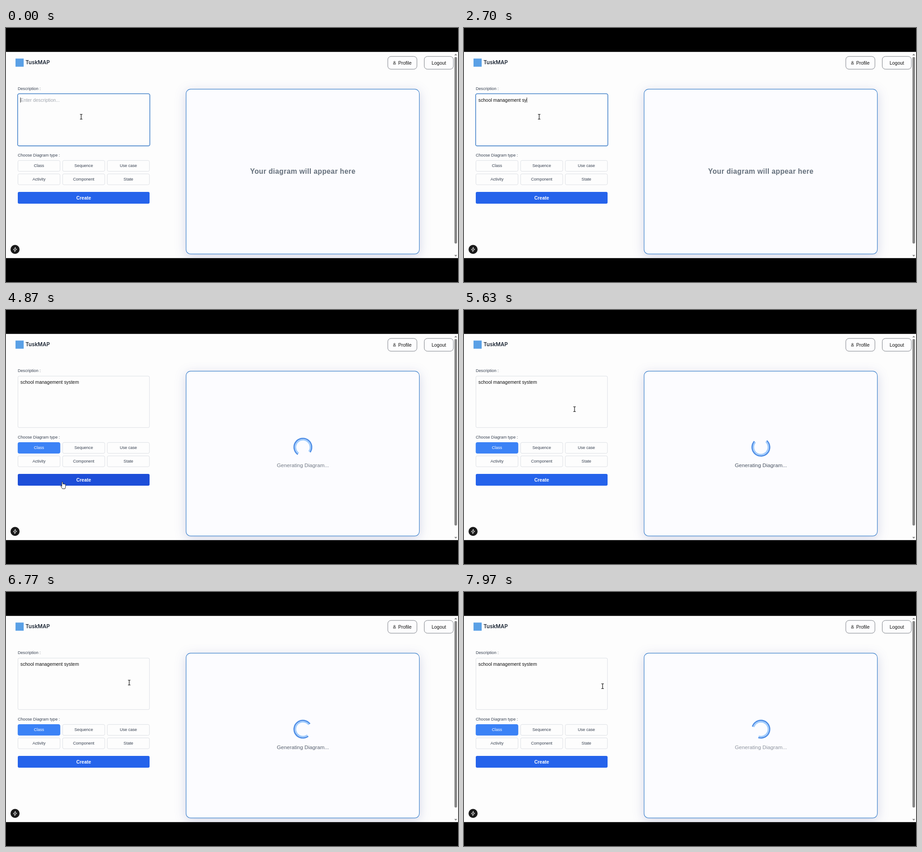
An HTML page for the animation above (8000 ms loop, 998 px wide and 561 px high).

```html
<!DOCTYPE html>
<html lang="en">
<head>
<meta charset="utf-8">
<title>Diagram generator</title>
<style>
html, body { margin: 0; width: 100%; height: 100%; overflow: hidden; background: #000; }
svg { display: block; width: 998px; height: 561px; font-family: "Liberation Sans", Arial, sans-serif; }
text { white-space: pre; }
.mid { text-anchor: middle; }
.label { font-size: 9.1px; fill: #374151; }
.body { font-size: 10.4px; fill: #111; }
.brand { font: 600 11.7px Inter, sans-serif; fill: #1f2937; }
.outline { fill: #fdfdfe; stroke: #7b7f86; }
.box { fill: #fdfdfd; stroke: #dcdfe4; }
.card { fill: #fcfcff; stroke: #3f83cd; stroke-width: 1.2; filter: drop-shadow(0 5px 12px rgba(50, 60, 150, .2)); }

/* one 8 s timeline shared by every scene change */
.focus, .early, .late, .beam, .hand { animation: 8s step-end infinite; }
.focus { animation-name: focus; }
.early { animation-name: early; }
.late { animation-name: late; }
.beam { animation-name: beam; }
.hand { animation-name: hand; }
@keyframes focus { 0% { opacity: 1 } 50.875%, 100% { opacity: 0 } }
@keyframes early { 0% { opacity: 1 } 57.94%, 100% { opacity: 0 } }
@keyframes late { 0% { opacity: 0 } 57.94%, 100% { opacity: 1 } }
@keyframes beam { 0% { opacity: 1 } 48.2% { opacity: 0 } 67.5%, 100% { opacity: 1 } }
@keyframes hand { 0% { opacity: 0 } 48.2% { opacity: 1 } 67.5%, 100% { opacity: 0 } }

.pick { animation: pick 8s linear infinite; }
.pick-text { animation: pick-text 8s linear infinite; }
.create { animation: create 8s linear infinite; }
@keyframes pick {
  0%, 50.875% { fill: #fdfdfd; stroke: #dcdfe4 }
  51.8%, 100% { fill: #3b82f6; stroke: #3b82f6 }
}
@keyframes pick-text { 0%, 50.875% { fill: #374151 } 51.8%, 100% { fill: #fff } }
@keyframes create {
  0%, 55% { fill: #2563eb }
  56%, 64.5% { fill: #1d4ed8 }
  65.5%, 100% { fill: #2563eb }
}

.spin { animation: spin .5s linear -365ms infinite; }
.pulse { animation: pulse 1s cubic-bezier(.4, 0, .6, 1) -365ms infinite; }
@keyframes spin { to { transform: rotate(360deg) } }
@keyframes pulse { 50% { opacity: .5 } }

.pointer { animation: move 8s linear infinite; }
@keyframes move {
  0%, 45.6% { transform: translate(166px, 196px) }
  47.875% { transform: translate(76px, 294px) }
  49.1%, 52% { transform: translate(72px, 314px) }
  54% { transform: translate(92px, 346px) }
  57%, 60.9% { transform: translate(126px, 387px) }
  61.5% { transform: translate(127px, 386px) }
  64.8% { transform: translate(166px, 364px) }
  67.5% { transform: translate(221px, 272px) }
  70.375% { transform: translate(244px, 219px) }
  71.6% { transform: translate(248px, 217px) }
  81.5% { transform: translate(262px, 214px) }
  84.625% { transform: translate(272px, 200px) }
  92.5% { transform: translate(291px, 203px) }
  99.6%, 100% { transform: translate(306px, 208px) }
}
</style>
</head>
<body>
<svg viewBox="0 0 998 561">
  <rect y="52.5" width="998" height="456" fill="#fdfdfd"/>

  <rect x="21" y="67.5" width="18" height="18" fill="#5aa0e6"/>
  <text class="brand" x="43" y="80.3">TuskMAP</text>
  <rect class="outline" x="843" y="62.8" width="64.3" height="28.2" rx="7"/>
  <g fill="none" stroke="#222" stroke-width=".9">
    <circle cx="857.7" cy="75.2" r="1.6"/>
    <path d="M855.3 80V79a2.4 2.1 0 0 1 4.8 0V80Z"/>
  </g>
  <text class="body" x="866" y="80.6">Profile</text>
  <rect class="outline" x="923.5" y="62.8" width="64.3" height="28.2" rx="7"/>
  <text class="body mid" x="955.7" y="80.6">Logout</text>

  <text class="label" x="26" y="136.5">Description :</text>
  <rect class="box" x="26.3" y="146" width="290.5" height="113.7" rx="3"/>
  <rect class="focus" x="25.7" y="145.2" width="291.9" height="115.2" rx="3.5" fill="#fdfdfd" stroke="#4482c9" stroke-width="1.6"/>
  <text class="body" id="hint" x="32" y="162.7" style="fill:#a2a7af">Enter description...</text>
  <text class="body" id="typed" x="31.7" y="162.7"></text>
  <rect id="caret" y="153.5" width=".9" height="11.2" fill="#111"/>

  <text class="label" x="26" y="283.8">Choose Diagram type :</text>
  <g id="types"></g>
  <rect class="create" x="26" y="362" width="291" height="26" rx="3"/>
  <text class="mid" x="171.5" y="378.8" font-size="10.4" font-weight="700" fill="#fff">Create</text>

  <rect class="card" x="397.6" y="135.2" width="515" height="364" rx="10"/>
  <text class="early" x="539" y="322" font-size="15.6" font-weight="700" letter-spacing=".39" fill="#65707c">Your diagram will appear here</text>
  <g class="late">
    <g transform="translate(655.5 303)">
      <g class="spin" fill="none">
        <g transform="rotate(-45)">
          <circle r="19.4" stroke="#3f84e4" stroke-width="2.6" pathLength="100" stroke-dasharray="75 25"/>
          <circle r="16.2" stroke="#93c5fd" stroke-width="2.4" pathLength="100" stroke-dasharray="75 25"/>
        </g>
      </g>
    </g>
    <text class="pulse mid" x="655.5" y="347" font-size="11.7" fill="#4b5563">Generating Diagram...</text>
  </g>

  <circle cx="20" cy="489" r="10" fill="#1a1a1a"/>
  <path d="M20.8 484.2L16.2 490h3.4l-.6 4.2 4.8-5.9h-3.5Z" fill="none" stroke="#fff" stroke-linejoin="round"/>

  <g fill="#858585">
    <rect x="990.2" y="64" width="5.6" height="412" rx="2.8"/>
    <path d="M989.8 60.5h6.4L993 56.7ZM989.8 501.3h6.4L993 505Z"/>
  </g>
  <path d="M0 0H998V52.5H0ZM0 508.5H998V561H0Z"/>

  <g class="pointer">
    <path class="beam" d="M-2.6-5.4Q0-5.6 0-4.4Q0-5.6 2.6-5.4M0-4.6V4.6M-2.6 5.4Q0 5.6 0 4.4Q0 5.6 2.6 5.4" fill="none" stroke="#111" stroke-width="1.2"/>
    <path class="hand" d="M-2.8 2.5V-6a1.2 1.2 0 0 1 2.4 0V-2.4a1.1 1.1 0 0 1 2.1 .2a1.1 1.1 0 0 1 2 .5a1 1 0 0 1 1.9 .7V3L4.3 7.8H-1.4L-5 2.3a1.1 1.1 0 0 1 1.6-1.3Z" fill="#fff" stroke="#111" stroke-width=".9" stroke-linejoin="round"/>
  </g>
</svg>
<script>
const $ = id => document.getElementById(id);
const LOOP = 8000, BLUR = 4070, BLINK = 260;
const phrase = "school management system";
const keys = [30, 200, 370, 630, 760, 870, 940, 1030, 1100, 1370, 1430, 1670, 1730,
  1930, 2030, 2270, 2370, 2430, 2570, 2670, 2730, 2970, 3100, 3270];

$("types").innerHTML = ["Class", "Sequence", "Use case", "Activity", "Component", "State"].map((name, i) => {
  const x = 26.3 + i % 3 * 98.7, y = 292.6 + Math.floor(i / 3) * 29.6;
  const [box, text] = i ? ["", ""] : ["pick", "pick-text"];
  return `<rect class="box ${box}" x="${x}" y="${y}" width="93" height="24" rx="3"/>
    <text class="label mid ${text}" x="${x + 46.5}" y="${y + 14.8}">${name}</text>`;
}).join("");

let start, shown = -1;
function draw(now) {
  start ??= now;
  const t = (now - start) % LOOP;
  const count = keys.filter(k => k <= t).length;
  if (count !== shown) {
    shown = count;
    $("typed").textContent = phrase.slice(0, count);
    $("hint").style.opacity = count ? 0 : 1;
    $("caret").setAttribute("x", 31.5 + (count ? $("typed").getComputedTextLength() : 0));
  }
  const idle = t - (count ? keys[count - 1] : 0);
  $("caret").style.opacity = t < BLUR && idle % (2 * BLINK) < BLINK ? 1 : 0;
  requestAnimationFrame(draw);
}
requestAnimationFrame(draw);
</script>
</body>
</html>
```
